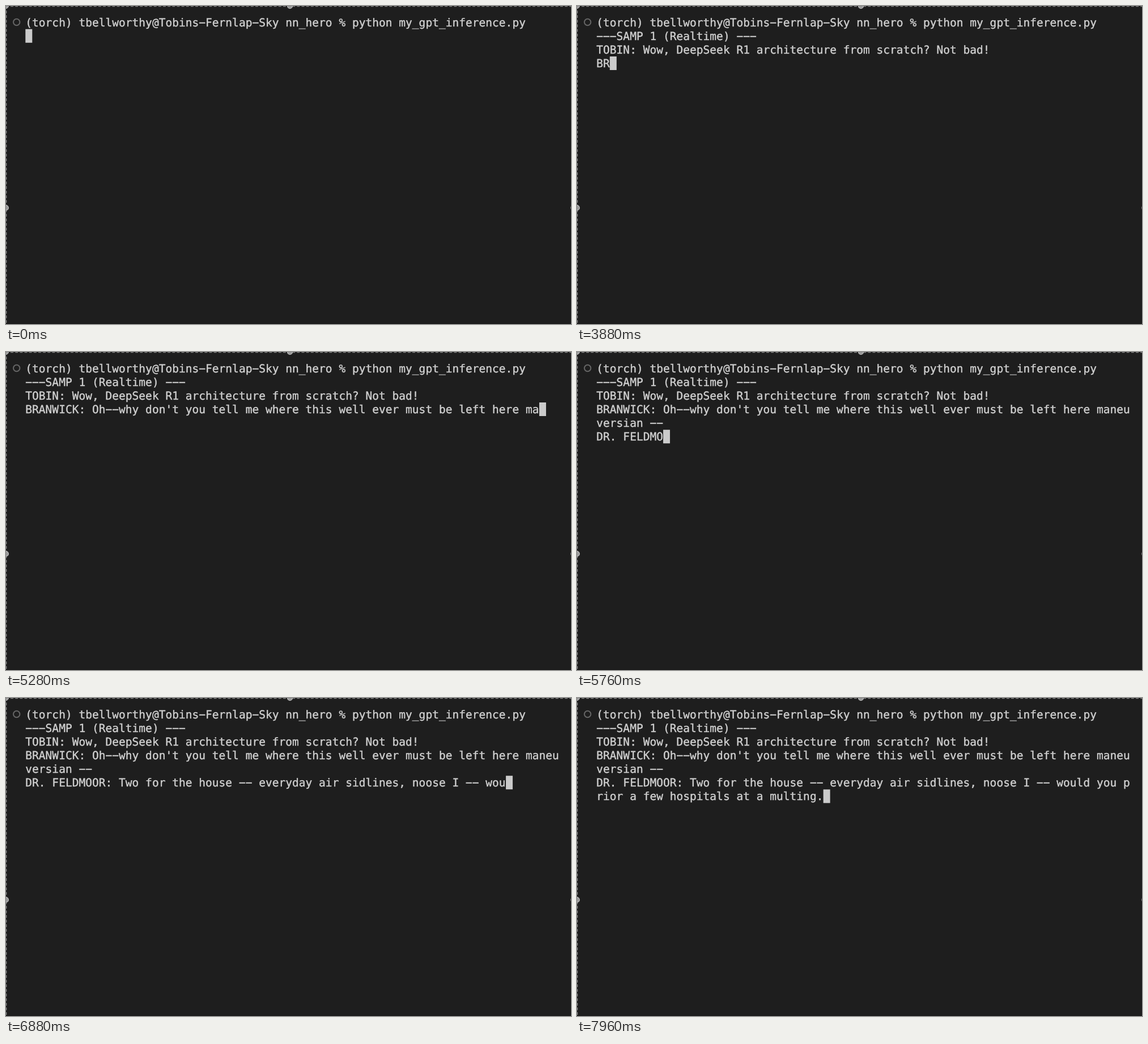
An HTML page that plays this animation: 997x561 px, repeating every 8 s.

```html
<!DOCTYPE html>
<html lang="en">
<head>
<meta charset="utf-8">
<title>Terminal session</title>
<style>
  html, body { margin: 0; width: 100%; height: 100%; overflow: hidden; background: #1e1e1e; }
  svg { display: block; width: 997px; height: 561px; }
  text {
    font: 19.56px "DejaVu Sans Mono", "Liberation Mono", monospace;
    fill: #d0d0d0; stroke: #d0d0d0; stroke-width: .4;
    white-space: pre; text-rendering: geometricPrecision;
  }
  .edge { stroke: #858585; stroke-width: 1.6; stroke-dasharray: 4.8 3.35; }
  .handle { fill: #969696; stroke: #b8b8b8; stroke-width: 1.5; }
</style>
</head>
<body>
<svg viewBox="0 0 997 561">
  <rect width="997" height="561" fill="#1e1e1e"/>
  <path d="M0 560.5H996.5V0" fill="none" stroke="#171717"/>
  <path class="edge" d="M0 .5H997"/>
  <path class="edge" d="M.5 0V561"/>
  <circle class="handle" cx="0" cy="0" r="4"/>
  <circle class="handle" cx="501" cy="0" r="4.3"/>
  <circle class="handle" cx="0" cy="356" r="4.3"/>
  <circle cx="1000.5" cy="356" r="4.5" fill="#777"/>
  <circle cx="18.7" cy="28.5" r="5.7" fill="none" stroke="#666" stroke-width="2"/>
  <g id="lines"></g>
  <rect id="cursor" width="12" height="24" fill="#cbcbcb"/>
</svg>
<script>
const LOOP = 8000, TICK = 40, COLS = 80;
const LEFT = 34.3, ADVANCE = 11.775, PITCH = 24.1, BASELINE = 35.8, CURSOR_TOP = 16.7;
const OUTPUT_AT = 1000;

const prompt = "(torch) tbellworthy@Tobins-Fernlap-Sky nn_hero % python my_gpt_inference.py";
const header = [
  "---SAMP 1 (Realtime) ---",
  "TOBIN: Wow, DeepSeek R1 architecture from scratch? Not bad!"
];
const reply =
  "BRANWICK: Oh--why don't you tell me where this well ever must be left here maneuversian --\n" +
  "DR. FELDMOOR: Two for the house -- everyday air sidlines, noose I -- would you prior a few hospitals at a multing.";

// Typing pace: [time in ms, characters shown]
const pace = [
  [3840, 0], [4440, 31], [4680, 46], [5280, 77], [5520, 89],
  [5760, 101], [6880, 163], [7200, 173], [7960, 205]
];

const cursor = document.getElementById("cursor");
const group = document.getElementById("lines");
const rows = Array.from({ length: 7 }, (_, i) => {
  const el = document.createElementNS("http://www.w3.org/2000/svg", "text");
  el.setAttribute("x", LEFT);
  el.setAttribute("y", BASELINE + i * PITCH);
  return group.appendChild(el);
});

function typedCount(t) {
  if (t <= pace[0][0]) return 0;
  for (let i = 1; i < pace.length; i++) {
    const [t0, n0] = pace[i - 1], [t1, n1] = pace[i];
    if (t <= t1) return Math.floor(n0 + (n1 - n0) * (t - t0) / (t1 - t0));
  }
  return reply.length;
}

function wrap(text) {
  return text.split("\n").flatMap(line => {
    const parts = [];
    do {
      parts.push(line.slice(0, COLS));
      line = line.slice(COLS);
    } while (line);
    return parts;
  });
}

// The minus sign gives the wide hyphen of the terminal face.
const wideHyphens = s => s.replace(/-/g, "\u2212");

function draw(ms) {
  const t = Math.floor(ms / TICK) * TICK;
  const lines = t < OUTPUT_AT
    ? [prompt, ""]
    : [prompt, ...header, ...wrap(reply.slice(0, typedCount(t)))];
  rows.forEach((el, i) => {
    const s = wideHyphens(lines[i] || "");
    if (el.textContent !== s) el.textContent = s;
  });
  const row = lines.length - 1;
  const col = Math.min(lines[row].length, COLS - 1);
  cursor.setAttribute("x", LEFT + col * ADVANCE);
  cursor.setAttribute("y", CURSOR_TOP + row * PITCH);
}

const start = performance.now();
function frame() {
  draw((performance.now() - start) % LOOP);
  requestAnimationFrame(frame);
}
frame();
</script>
</body>
</html>
```
